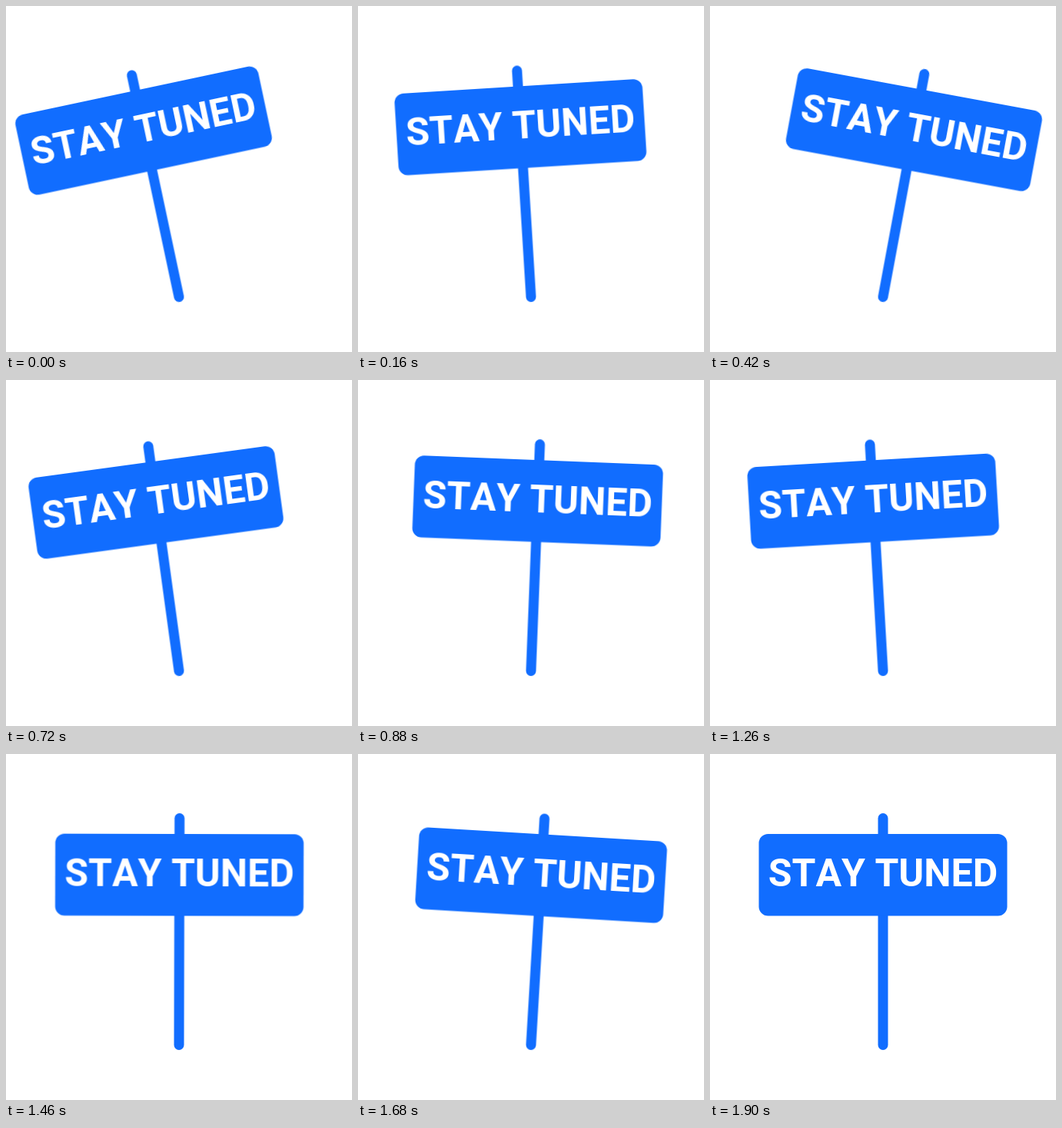
Animation of 450 by 450 pixels, one loop 1.92 s. Source, as an HTML page:

```html
<!DOCTYPE html>
<html lang="en">
<head>
<meta charset="utf-8">
<title>Stay tuned</title>
<style>
  html, body {
    margin: 0;
    width: 100%;
    height: 100%;
    overflow: hidden;
    background: #fff;
  }
  svg {
    display: block;
    width: 100%;
    height: 100%;
  }
  .sign {
    fill: #116dff;
    transform-origin: 225px 378.5px;
    animation: sway 1920ms cubic-bezier(.333, 0, .667, 1) infinite;
  }
  .label {
    fill: #fff;
    font: 700 50px Roboto, Arial, sans-serif;
    font-kerning: none;
    text-anchor: middle;
  }
  /* Swings in pairs that shrink by 4 degrees, then rests upright */
  @keyframes sway {
    0%, 1.3% { transform: rotate(-12deg); }
    19%      { transform: rotate(12deg); }
    36.46%   { transform: rotate(-8deg); }
    52.3%    { transform: rotate(8deg); }
    67.97%   { transform: rotate(-4deg); }
    83.85%   { transform: rotate(4deg); }
    99.2%, 100% { transform: rotate(0deg); }
  }
</style>
</head>
<body>
<svg viewBox="0 0 450 450">
  <g class="sign">
    <rect x="218.5" y="77" width="13" height="308" rx="6.5"/>
    <rect x="63.5" y="104" width="323" height="106.5" rx="12"/>
    <text class="label" x="225" y="172">STAY TUNED</text>
  </g>
</svg>
</body>
</html>
```
